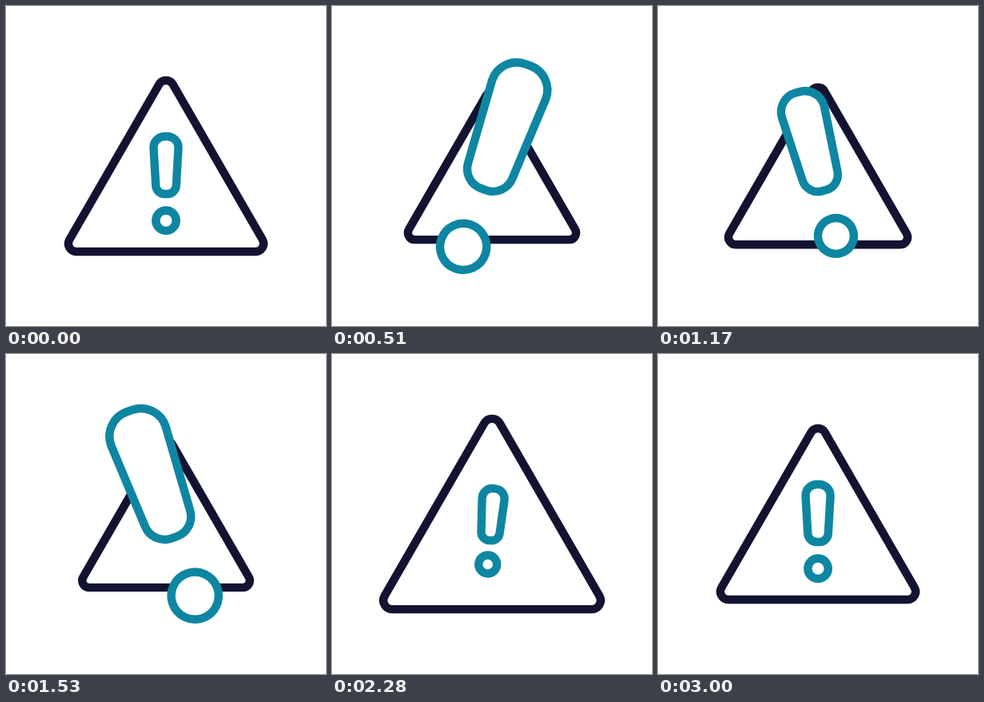
An HTML page for the animation above (3.03 s loop, 400 by 400 pixels).

```html
<!DOCTYPE html>
<html lang="en">
<head>
<meta charset="utf-8">
<title>Warning</title>
<style>
  html, body { margin: 0; width: 100%; height: 100%; overflow: hidden; background: #fff; }
  svg { display: block; width: 100%; height: 100%; }
  path, circle { fill: #fff; stroke: #0e86a2; stroke-width: 10.4; vector-effect: non-scaling-stroke; }
  #triangle { stroke: #121331; }
</style>
</head>
<body>
<svg viewBox="-200 -200 400 400">
  <path id="triangle" d="M-112 107A10 10 0 0 1 -120.66 92L-8.66 -102A10 10 0 0 1 8.66 -102L120.66 92A10 10 0 0 1 112 107Z"/>
  <!-- drawn around the point the mark grows from -->
  <g id="mark">
    <path d="M-1.5 -75H1.5A14 14 0 0 1 15.5 -60.7L12.8 -13.8A11.3 11.3 0 0 1 1.5 -3H-1.5A11.3 11.3 0 0 1 -12.8 -13.8L-15.5 -60.7A14 14 0 0 1 -1.5 -75Z"/>
    <circle cy="30.2" r="12.7"/>
  </g>
</svg>
<script>
const LOOP = 3030, STEP = 30, PIVOT = 38;
const SWELL = 450, DIP = 950, OVERSHOOT = 2220, RECOIL = 2570, REST = 2950;

// 0 before a, 1 after b, half cosine between
function ramp(t, a, b) {
  const p = Math.min(1, Math.max(0, (t - a) / (b - a)));
  return (1 - Math.cos(Math.PI * p)) / 2;
}

// swell, sink by depth, swell again until peak, let go at release
function pulse(t, depth, peak, release) {
  return ramp(t, 0, SWELL) - depth * (ramp(t, SWELL, DIP) - ramp(t, DIP, peak)) - ramp(t, release, OVERSHOOT);
}

// overshoot after the release, then settle
function rebound(t, release) {
  return ramp(t, release, OVERSHOOT) - 1.15 * ramp(t, OVERSHOOT, RECOIL) + .15 * ramp(t, RECOIL, REST);
}

function pose(t) {
  const drift = ramp(t, SWELL, 850) - ramp(t, 850, 1400);
  const swing = ramp(t, 0, 500) - 2 * ramp(t, 550, 1350) + ramp(t, 1680, OVERSHOOT);
  return {
    triangleSize: 1 - .142 * pulse(t, .6, 1550, 1740) + .123 * rebound(t, 1740),
    markSize: 1 + 1.33 * pulse(t, .82, 1400, 1590) - .105 * rebound(t, 1590),
    tilt: 19.5 * swing + 5.2 * rebound(t, 1680),
    x: -2 * drift,
    y: PIVOT - 3 * drift - 2.3 * rebound(t, 1620)
  };
}

const triangle = document.getElementById('triangle');
const mark = document.getElementById('mark');
const start = performance.now();

function draw() {
  const elapsed = Math.max(0, performance.now() - start) % LOOP;
  const p = pose(Math.floor(elapsed / STEP) * STEP);
  triangle.setAttribute('transform', `scale(${p.triangleSize})`);
  mark.setAttribute('transform', `rotate(${p.tilt}) translate(${p.x} ${p.y}) scale(${p.markSize})`);
  requestAnimationFrame(draw);
}
draw();
</script>
</body>
</html>
```
